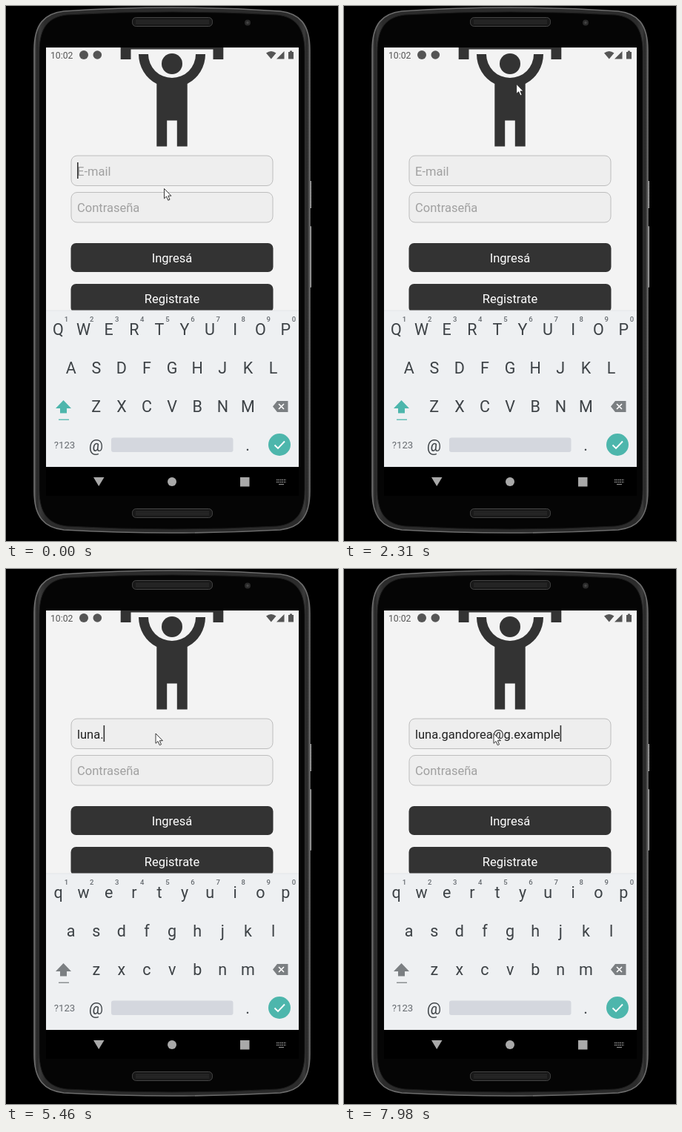
These frames come from a looping animation (448x722 px, 8 s). An HTML page:

```html
<!DOCTYPE html>
<html lang="es">
<head>
<meta charset="utf-8">
<title>Login</title>
<style>
  html, body { margin: 0; width: 100%; height: 100%; overflow: hidden; background: #000; }
  svg { display: block; width: 448px; height: 722px; font-family: Roboto, sans-serif; }
  .field { fill: #eee; stroke: #bdbdbd; }
  .text { font-size: 16.5px; }
  .mid { text-anchor: middle; }
  .hint { fill: #a0a0a0; }
  .key { font-size: 21.5px; fill: #3d4246; text-anchor: middle; }
  .num { font-size: 9.5px; fill: #666b70; font-weight: 500; text-anchor: middle; }
</style>
</head>
<body>
<svg viewBox="0 0 448 722">
  <defs>
    <linearGradient id="rim">
      <stop offset="0" stop-color="#5c5c5c"/>
      <stop offset=".01" stop-color="#262626"/>
      <stop offset=".02" stop-color="#3a3a3a"/>
      <stop offset=".04" stop-color="#2b2b2b"/>
      <stop offset=".96" stop-color="#2b2b2b"/>
      <stop offset=".98" stop-color="#3a3a3a"/>
      <stop offset=".99" stop-color="#262626"/>
      <stop offset="1" stop-color="#5c5c5c"/>
    </linearGradient>
    <clipPath id="screen"><rect x="54" y="56" width="341" height="355"/></clipPath>
    <g id="speaker">
      <rect x="170.5" y="-6" width="108" height="12" rx="5" fill="#191919" stroke="#444"/>
      <path d="M175 -2.2H274M175 0H274M175 2.2H274" stroke="#303030"/>
    </g>
  </defs>

  <!-- phone -->
  <rect x="408" y="236" width="4" height="37" fill="#777"/>
  <path d="M411 237V273" stroke="#ddd" stroke-width="2" stroke-dasharray="1 1"/>
  <rect x="408" y="297" width="4" height="83" rx="1" fill="#aaa"/>
  <path d="M38 60C38 24 52 10 78 7Q224 -3 370 7C396 10 410 24 410 60V655C410 690 396 704 370 707Q224 715 78 707C52 704 38 690 38 655Z" fill="url(#rim)" stroke="#6c6c6c" stroke-width="1.6"/>
  <path d="M45 62C45 28 58 15 82 12Q224 4 366 12C390 15 403 28 403 62V653C403 686 390 699 366 702Q224 710 82 702C58 699 45 686 45 653Z" fill="#050505" stroke="#1a1a1a"/>
  <use href="#speaker" y="21.5"/>
  <use href="#speaker" y="684.5"/>
  <circle cx="326" cy="22.5" r="4" fill="#2a2a2a"/>
  <circle cx="326" cy="22.5" r="1.7" fill="#444"/>

  <!-- app -->
  <g clip-path="url(#screen)">
    <rect x="54" y="56" width="341" height="355" fill="#f3f3f3"/>
    <g fill="#333">
      <path d="M154.700 56H293.300V72H279.500V58.500H168.500V72H154.700Z"/>
      <circle cx="224" cy="78" r="14"/>
      <path d="M179 65A45 45 0 0 0 203.300 105V189.400H217.200V154.500H230.800V189.400H244.700V105A45 45 0 0 0 269 65H256A32 32 0 0 1 192 65Z"/>
      <rect x="87.500" y="320" width="273" height="39" rx="7"/>
      <rect x="87.500" y="375" width="273" height="39" rx="7"/>
    </g>
    <g class="text mid" fill="#fff">
      <text x="224" y="346">Ingresá</text>
      <text x="224" y="401.3">Registrate</text>
    </g>
    <rect class="field" x="88" y="202" width="272" height="40.500" rx="8"/>
    <rect class="field" x="88" y="251.500" width="272" height="40.500" rx="8"/>
    <text class="text hint" x="96" y="278.3">Contraseña</text>
    <text class="text hint" id="hint" x="96" y="228.7">E-mail</text>
    <text class="text" id="mail" x="96" y="228.7" fill="#222"></text>
    <rect id="caret" x="96" y="211" width="1.600" height="22" fill="#333"/>
    <g fill="#555">
      <text x="60" y="70.5" font-size="12.2">10:02</text>
      <circle cx="105" cy="66" r="6"/>
      <circle cx="123.3" cy="66" r="5.8"/>
      <path d="M351 63.5Q357.8 58.5 364.5 63.5L357.8 71.5ZM375.5 61V71.5H365Z"/>
      <path d="M381 62H383V60.5H386V62H388V71.5H381Z"/>
    </g>
  </g>

  <!-- keyboard -->
  <rect x="54" y="411" width="341" height="211" fill="#eef0f2"/>
  <path d="M54 411H395" stroke="#e4e6e9"/>
  <g id="keys"></g>
  <g id="shift">
    <path d="M77.5 532L88 543H82V549.5H73V543H67Z"/>
    <path d="M71 557.5H85V559H71Z" opacity=".85"/>
  </g>
  <path d="M366 533H380.5V548H366L360 540.5Z" fill="#7b7f82"/>
  <path d="M368 537L375 544M375 537L368 544" stroke="#fff" stroke-width="1.6"/>
  <text class="mid" x="79" y="597" font-size="13.2" fill="#666b70">?123</text>
  <text class="key" x="121.5" y="600.5">@</text>
  <rect x="142" y="582.5" width="164.5" height="19.5" rx="3" fill="#d4d7de"/>
  <text class="key" x="326" y="600">.</text>
  <circle cx="369" cy="592" r="15" fill="#4db6ac"/>
  <path d="M362.5 592.5L367 597L376 587.5" fill="none" stroke="#fff" stroke-width="1.9"/>

  <!-- navigation bar -->
  <rect x="54" y="622" width="341" height="39" fill="#000"/>
  <g fill="#a9a9a9">
    <path d="M118 636H132.5L125.2 648Z"/>
    <circle cx="224" cy="642" r="6"/>
    <rect x="316" y="636" width="12.5" height="12.5"/>
  </g>
  <g stroke="#999" fill="none">
    <path d="M365 639.5H378M365 642.5H378" stroke-width="1.5" stroke-dasharray="1.5 1"/>
    <path d="M368 645.5H375"/>
  </g>

  <path id="mouse" d="M0 0V13.3L3 10.5L5.3 15.7L7.5 14.7L5.3 9.7H9.4Z" fill="#fff" stroke="#222" stroke-width=".9"/>
</svg>
<script>
const LOOP = 8000;
const ADDRESS = 'luna.gandorea@g.example';
// typing bursts: start, ms per key, keys
const BURSTS = [[4550, 190, 5], [5600, 110, 8], [6650, 140, 2], [6930, 130, 8]];
const presses = BURSTS.flatMap(([start, step, n]) => Array.from({ length: n }, (_, i) => start + i * step));
// pointer: time, x, y
const PATH = [
  [0, 213.5, 246.5], [560, 213.5, 246.5], [1540, 254, 11.5], [1900, 254, 11.5],
  [2800, 205, 227], [3080, 203.5, 225], [4060, 203.5, 225], [4270, 202, 222], [LOOP, 202, 222]
];
const ROWS = [['QWERTYUIOP', 70.5, 444], ['ASDFGHJKL', 87.7, 496], ['ZXCVBNM', 121.8, 548]];
const PITCH = 34.1;

const $ = id => document.getElementById(id);
const [hint, mail, caret, mouse, shift] = ['hint', 'mail', 'caret', 'mouse', 'shift'].map($);

function addText(cls, x, y, text) {
  const el = document.createElementNS('http://www.w3.org/2000/svg', 'text');
  el.setAttribute('class', cls);
  el.setAttribute('x', x);
  el.setAttribute('y', y);
  el.textContent = text;
  return $('keys').appendChild(el);
}

const letters = ROWS.flatMap(([row, x, y]) =>
  [...row].map((ch, i) => ({ ch, el: addText('key', x + i * PITCH, y, ch) })));
for (let i = 0; i < 10; i++) addText('num', 81.5 + i * PITCH, 425.5, (i + 1) % 10);

function pointerAt(t) {
  const i = PATH.findIndex(p => p[0] > t);
  const [t0, x0, y0] = PATH[i - 1], [t1, x1, y1] = PATH[i];
  const u = (t - t0) / (t1 - t0), e = u * u * (3 - 2 * u);
  return [x0 + (x1 - x0) * e, y0 + (y1 - y0) * e];
}

let shown = -1;
function setTyped(n) {
  if (n === shown) return;
  shown = n;
  mail.textContent = ADDRESS.slice(0, n);
  hint.style.display = n ? 'none' : '';
  caret.setAttribute('x', 96 + (n ? mail.getComputedTextLength() : 0));
  shift.setAttribute('fill', n ? '#7b7f82' : '#4db6ac');
  for (const { ch, el } of letters) el.textContent = n ? ch.toLowerCase() : ch;
}

function draw(t) {
  const n = presses.filter(p => p <= t).length;
  setTyped(n);
  const since = t - (n ? presses[n - 1] : -300);
  caret.style.visibility = since % 1000 < 500 ? 'visible' : 'hidden';
  mouse.setAttribute('transform', `translate(${pointerAt(t)})`);
}

const begin = performance.now();
function tick() {
  draw((performance.now() - begin) % LOOP);
  requestAnimationFrame(tick);
}
tick();
</script>
</body>
</html>
```
